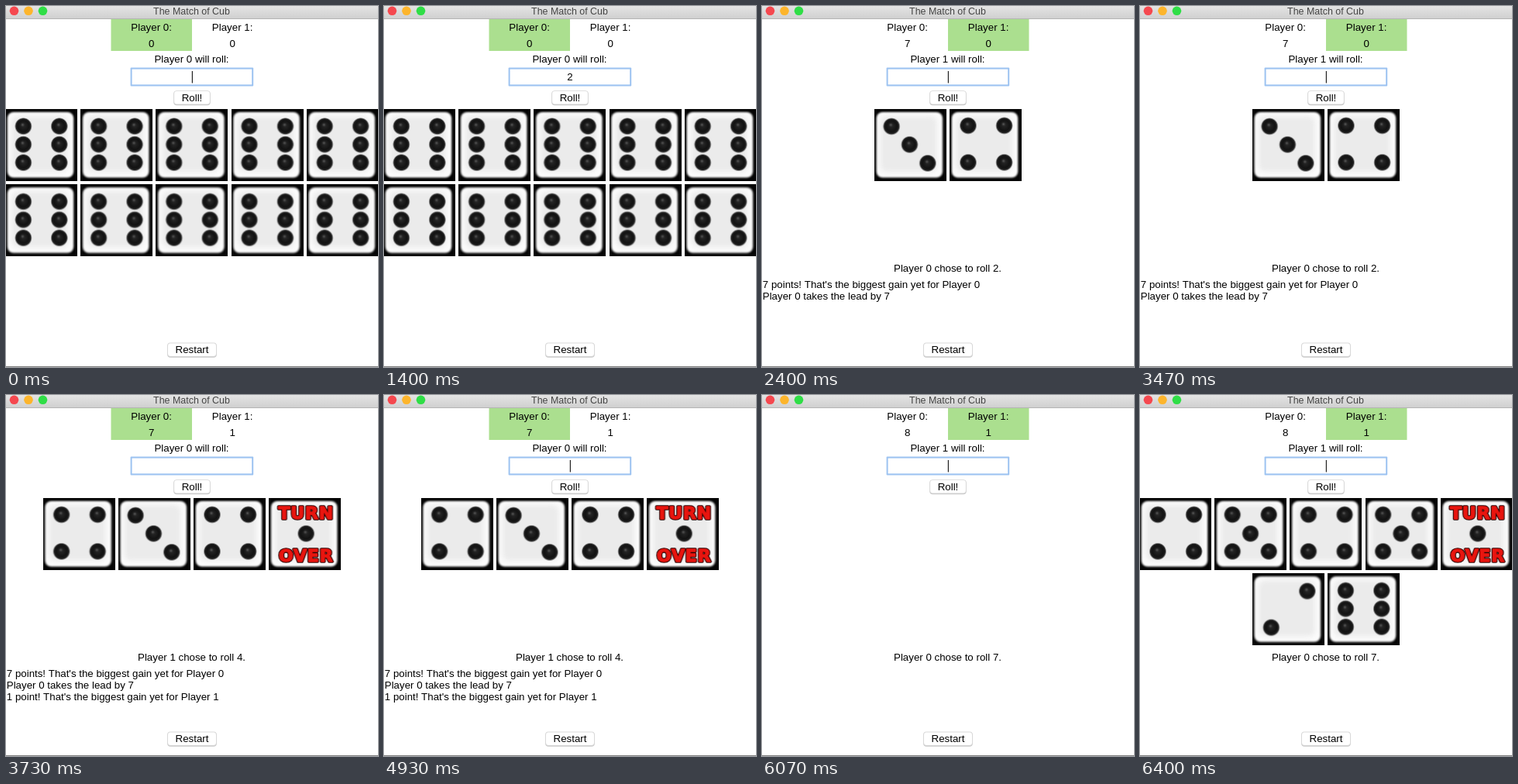
These frames come from a looping animation (480 px wide and 466 px high, 8 s). An HTML page with a canvas:

```html
<!DOCTYPE html>
<html lang="en">
<head>
<meta charset="utf-8">
<title>Dice game</title>
<style>
  html, body { margin: 0; width: 100%; height: 100%; overflow: hidden; background: #fff; }
  canvas { display: block; width: 480px; height: 466px; }
</style>
</head>
<body>
<canvas id="stage" width="480" height="466"></canvas>
<script>
const LOOP = 8000;
const ctx = document.getElementById('stage').getContext('2d');
const SANS = '13.3px "Liberation Sans", Arial, sans-serif';
const TITLE = '12.45px "Liberation Sans", Arial, sans-serif';
const CHUNKY = 'bold 22px "DejaVu Sans", sans-serif';

// Pip centres inside a 93 px die, by face
const PIPS = {
  1: [[48, 46]],
  2: [[71, 23], [24.5, 70]],
  3: [[22.3, 22.5], [45.6, 46], [69, 70]],
  4: [[24, 21.5], [70.6, 21.5], [24, 69], [70.6, 69]],
  5: [[23, 21.5], [70, 21.5], [46.3, 46], [23, 69], [70, 69]],
  6: [[23.4, 22.3], [69.8, 22.3], [23.4, 45.8], [69.8, 45.8], [23.4, 69.2], [69.8, 69.2]]
};

const LOG = [
  "7 points! That's the biggest gain yet for Player 0",
  'Player 0 takes the lead by 7',
  "1 point! That's the biggest gain yet for Player 1"
];

// Each turn: when it starts, when its dice land, and what the window shows
const TURNS = [
  { at: 0, land: 0, who: 0, scores: [0, 0], dice: Array(10).fill(6), note: '', lines: 0 },
  { at: 1670, land: 1730, who: 1, scores: [7, 0], dice: [3, 4], note: 'Player 0 chose to roll 2.', lines: 2 },
  { at: 3670, land: 3730, who: 0, scores: [7, 1], dice: [4, 3, 4, 1], note: 'Player 1 chose to roll 4.', lines: 3 },
  { at: 6070, land: 6130, who: 1, scores: [8, 1], dice: [4, 5, 4, 5, 1, 2, 6], note: 'Player 0 chose to roll 7.', lines: 0 }
];

const TYPED = [[1400, 1670, '2'], [5730, 6070, '7']];
const CARET_OFF = [[530, 800], [1400, 1670], [3670, 4070], [4670, 4930], [5530, 5870]];

const during = (t, [from, to]) => t >= from && t < to;

function text(str, x, y, font = SANS, color = '#000', align = 'center') {
  ctx.font = font;
  ctx.fillStyle = color;
  ctx.textAlign = align;
  ctx.fillText(str, x, y);
}

function rounded(c, x, y, w, h, r, color) {
  c.fillStyle = color;
  c.beginPath();
  c.roundRect(x, y, w, h, r);
  c.fill();
}

function disc(c, x, y, r, color) {
  c.fillStyle = color;
  c.beginPath();
  c.arc(x, y, r, 0, Math.PI * 2);
  c.fill();
}

function pip(c, x, y) {
  const shade = c.createRadialGradient(x, y - 1, 1, x, y, 11.4);
  shade.addColorStop(0, '#262626');
  shade.addColorStop(0.6, '#121212');
  shade.addColorStop(0.82, '#222');
  shade.addColorStop(1, 'rgba(70,70,70,0)');
  disc(c, x, y, 11.4, shade);
  const glint = c.createRadialGradient(x - 1, y - 2, 0, x - 1, y - 2, 3);
  glint.addColorStop(0, 'rgba(130,130,130,.6)');
  glint.addColorStop(1, 'rgba(80,80,80,0)');
  disc(c, x - 1, y - 2, 3, glint);
}

function chunky(c, str, y) {
  c.font = CHUNKY;
  c.letterSpacing = '0.8px';
  c.textAlign = 'center';
  c.lineJoin = 'round';
  for (const [width, color] of [[3.6, '#2a0505'], [1.4, '#e8150f']]) {
    c.lineWidth = width;
    c.strokeStyle = color;
    c.strokeText(str, 48, y);
  }
  c.fillStyle = '#e8150f';
  c.fillText(str, 48, y);
}

const dieCache = {};
function dieImage(face) {
  if (dieCache[face]) return dieCache[face];
  const img = document.createElement('canvas');
  img.width = img.height = 93;
  const c = img.getContext('2d');
  c.fillStyle = '#050505';
  c.fillRect(0, 0, 93, 93);
  // Bright rim around a slightly greyer face
  c.filter = 'blur(1.3px)';
  rounded(c, 2.8, 4, 85.4, 84.6, 8, '#fcfcfc');
  c.filter = 'blur(3px)';
  rounded(c, 8, 9, 73, 72, 8, '#ebebeb');
  c.filter = 'none';
  PIPS[face].forEach(([x, y]) => pip(c, x, y));
  if (face === 1) {
    chunky(c, 'TURN', 27.3);
    chunky(c, 'OVER', 81.8);
  }
  return dieCache[face] = img;
}

function drawDice(dice) {
  for (let row = 0; row * 5 < dice.length; row++) {
    const faces = dice.slice(row * 5, row * 5 + 5);
    const left = 242 - faces.length * 48.6;
    faces.forEach((face, i) => {
      ctx.drawImage(dieImage(face), left + i * 97.2, 133 + row * 97.2);
    });
  }
}

function button(label, x, y, w, h, base) {
  rounded(ctx, x, y + 0.5, w, h + 0.5, 4, '#c6c6c6');
  rounded(ctx, x, y, w, h, 4, '#dadada');
  rounded(ctx, x + 0.8, y + 0.8, w - 1.6, h - 1.6, 3.4, '#fff');
  text(label, x + w / 2, base);
}

function drawFrame() {
  ctx.fillStyle = '#fff';
  ctx.fillRect(0, 0, 480, 466);
  const bar = ctx.createLinearGradient(0, 0, 0, 16);
  bar.addColorStop(0, '#e4e4e4');
  bar.addColorStop(1, '#d0d0d0');
  ctx.fillStyle = bar;
  ctx.fillRect(0, 0, 480, 16);
  ctx.fillStyle = '#b4b4b4';
  ctx.fillRect(0, 16, 480, 1);
  ctx.fillStyle = '#808080';
  ctx.fillRect(0, 465, 480, 1);
  ['#f5484f', '#fdb52c', '#2fde46'].forEach((color, i) => {
    disc(ctx, 10.5 + i * 18.5, 6.3, 5.8, color);
  });
  text('The Match of Cub', 239.5, 10.7, TITLE, '#444');
}

function drawEntry(typed, caret) {
  rounded(ctx, 160.6, 79.6, 158.6, 23.8, 1, '#9dc3f1');
  ctx.fillStyle = '#fff';
  ctx.fillRect(162.6, 81.6, 154.6, 19.8);
  text(typed, 240, 96.2);
  if (caret) {
    ctx.fillStyle = '#222';
    ctx.fillRect(typed ? 243.8 : 239.8, 84, 1.2, 15.5);
  }
}

function draw(turn, landed, typed, caret) {
  drawFrame();
  ctx.fillStyle = '#abdf8f';
  ctx.fillRect(turn.who ? 240 : 135.5, 17, 104.5, 41);
  turn.scores.forEach((score, i) => {
    const x = 187.6 + i * 104.5;
    text(`Player ${i}:`, x, 32.2);
    text(score, x, 52.6);
  });
  text(`Player ${turn.who} will roll:`, 239.5, 73.3);
  drawEntry(typed, caret);
  button('Roll!', 216.3, 109.3, 47.4, 18, 122.8);
  if (landed) drawDice(turn.dice);
  text(turn.note, 239.5, 342.7);
  LOG.slice(0, turn.lines).forEach((line, i) => {
    text(line, 0.8, 364 + i * 15, SANS, '#000', 'left');
  });
  button('Restart', 208.2, 434.6, 63.6, 18.2, 448.2);
}

const start = performance.now();
let shown = '';

function tick() {
  const t = Math.max(0, performance.now() - start) % LOOP;
  const turn = TURNS.filter(s => t >= s.at).pop();
  const landed = t >= turn.land;
  const key = TYPED.find(span => during(t, span));
  const typed = key ? key[2] : '';
  const caret = !CARET_OFF.some(span => during(t, span));
  const state = [turn.at, landed, typed, caret].join();
  if (state !== shown) {
    draw(turn, landed, typed, caret);
    shown = state;
  }
  requestAnimationFrame(tick);
}
tick();
</script>
</body>
</html>
```
